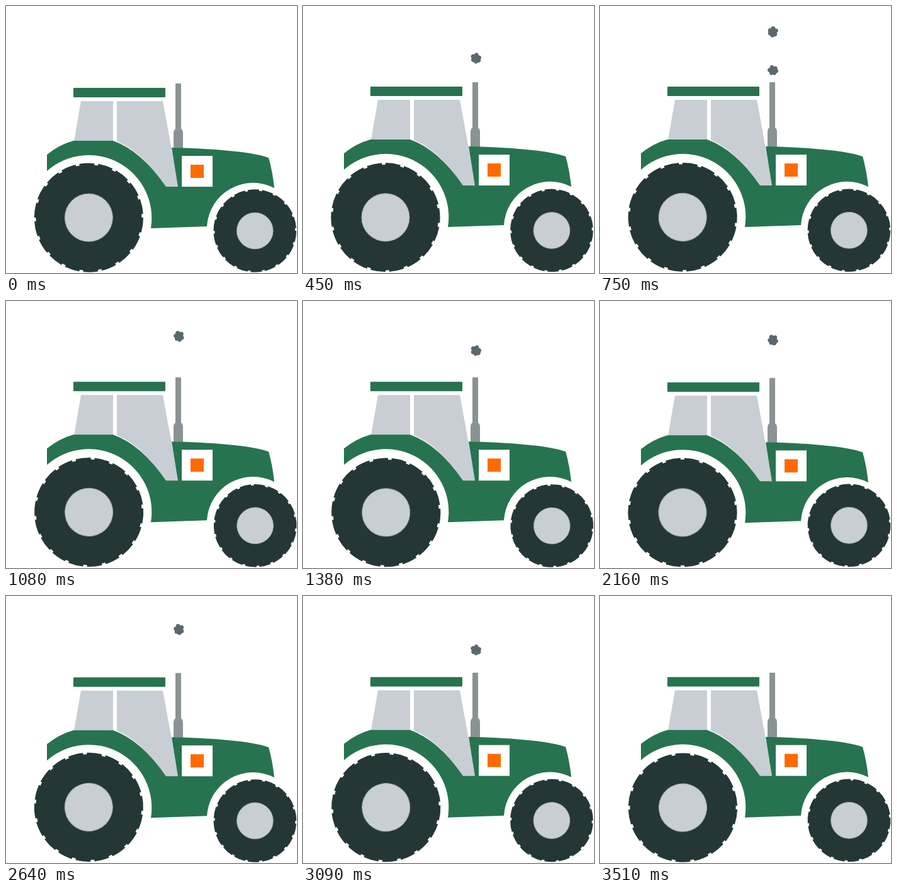
An HTML page for the animation above (3540 ms loop, 462x424 px).

```html
<!DOCTYPE html>
<html lang="en">
<head>
<meta charset="utf-8">
<title>Tractor</title>
<style>
  html, body { margin: 0; width: 100%; height: 100%; overflow: hidden; background: #fff; }
  svg { display: block; width: 462px; height: 424px; }
  .green { fill: #277350; }
  .glass { fill: #c8ced4; }
  .steel { fill: #8a9394; }
  .tyre { fill: #243736; }
  .lugs { fill: none; stroke: #243736; stroke-width: 6; stroke-dasharray: .8 .2; }
  .hub { fill: #c8ced4; stroke: #9da7a9; stroke-width: 1; }
  .puff { fill: #5b686d; }
</style>
</head>
<body>
<svg viewBox="0 0 462 424">
  <defs>
    <g id="wheel">
      <circle class="tyre" r="84"/>
      <circle class="lugs" r="83.6" pathLength="18"/>
      <circle class="hub" r="38"/>
    </g>
    <g id="cloud">
      <circle r="5.5"/>
      <circle cx="5" cy="-1" r="3.7"/>
      <circle cx="2.5" cy="-4.6" r="3.3"/>
      <circle cx="-3.4" cy="-4" r="3.4"/>
      <circle cx="-5" cy="1.6" r="3.5"/>
      <circle cx="-.6" cy="4.8" r="3.4"/>
      <circle cx="4" cy="3.6" r="3"/>
    </g>
  </defs>

  <g id="smoke" class="puff"></g>

  <g id="body">
    <path class="steel" d="M269 124q0-1 1-1h7q1 0 1 1V195q3 2 3 7V226H266V202q0-5 3-7z"/>
    <rect class="green" x="107" y="130" width="146" height="15" rx="1"/>
    <path class="glass" d="M119 151H170V215H108z"/>
    <path class="glass" d="M176 151H249L274 288H254Q215 230 176 215z"/>
    <path class="green" d="M65 236Q85 220 107 214H170Q215 230 254 287H273L263 225C320 226 392 231 417 241Q423 262 426 289A73.4 73.4 0 0 0 319 350L230 353A100 100 0 0 0 65 262z"/>
    <rect x="279" y="238" width="49" height="49" fill="#fff"/>
    <rect x="293" y="252" width="21" height="21" fill="#ff6a00"/>
  </g>

  <use id="rear" href="#wheel"/>
  <use id="front" href="#wheel"/>
</svg>
<script>
  const LOOP = 3540, STEP = 30;
  const SHAKE = 300, REAR_TURN = 1800, FRONT_TURN = 1350;
  const LIFE = 560, RISE = 0.14;
  const starts = [200, 637, 1100, 1760, 2176, 2860];

  const get = id => document.getElementById(id);
  const place = (el, value) => el.setAttribute('transform', value);

  const puffs = starts.map(start => {
    const el = document.createElementNS('http://www.w3.org/2000/svg', 'use');
    el.setAttribute('href', '#cloud');
    get('smoke').append(el);
    return { el, start };
  });

  // Wheels turn slightly off centre.
  function spin(id, x, y, scale, turn, t) {
    place(get(id), `translate(${x} ${y}) rotate(${t / turn * 360}) translate(0 .4) scale(${scale})`);
  }

  function draw(t) {
    const bob = Math.cos(t / SHAKE * 2 * Math.PI) - 1;
    place(get('body'), `translate(0 ${bob})`);
    spin('rear', 131.4, 335.7, 1, REAR_TURN, t);
    spin('front', 395.2, 356.6, 0.76, FRONT_TURN, t);

    for (const { el, start } of puffs) {
      const age = t - start;
      const alive = age >= 0 && age < LIFE;
      el.style.display = alive ? '' : 'none';
      if (!alive) continue;
      const size = Math.min(1, 0.3 + age / 170);
      place(el, `translate(274.5 ${118 - age * RISE}) rotate(${age * 0.2}) scale(${size})`);
    }
  }

  const begin = performance.now();
  function tick() {
    const t = (performance.now() - begin) % LOOP;
    draw(Math.floor(t / STEP) * STEP);
    requestAnimationFrame(tick);
  }
  tick();
</script>
</body>
</html>
```
